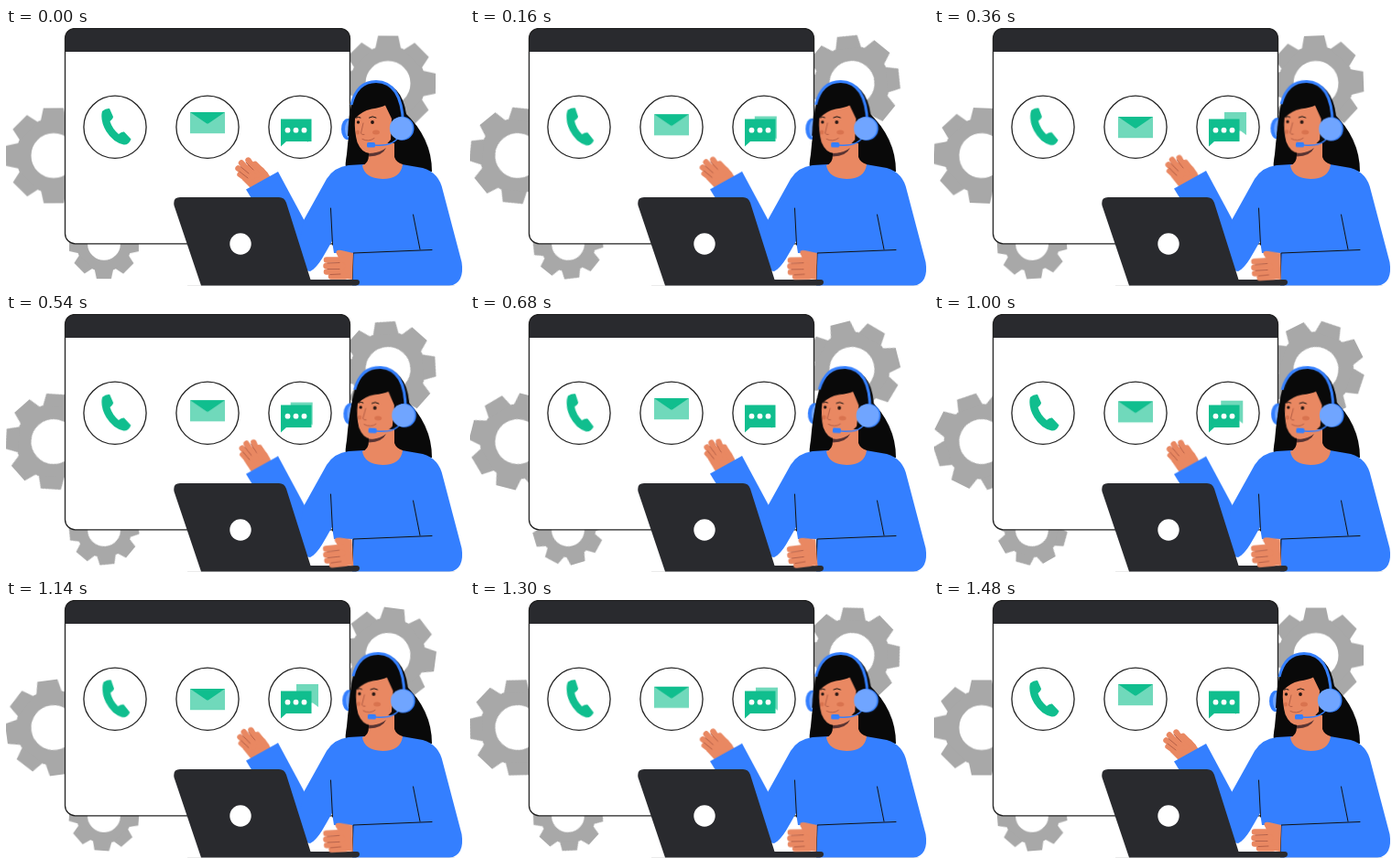
Recreate the animation shown at these times as an HTML page without scripts. Size 500x282 px, loop 1500 ms.

```html
<!DOCTYPE html>
<html lang="en">
<head>
<meta charset="utf-8">
<title>Support agent</title>
<style>
  :root {
    --ink: #292a2e;
    --blue: #347fff;
    --pale-blue: #70a5ff;
    --green: #10be8e;
    --mint: #70d9bb;
    --skin: #e98862;
    --crease: #a9553f;
  }
  html, body { margin: 0; width: 100%; height: 100%; overflow: hidden; background: #fff; }
  svg { display: block; width: 100%; height: 100%; }

  .ink { fill: var(--ink); }
  .blue { fill: var(--blue); }
  .pale { fill: var(--pale-blue); }
  .green { fill: var(--green); }
  .mint { fill: var(--mint); }
  .skin { fill: var(--skin); }
  .hair { fill: #090909; }
  .line { fill: none; stroke: #111; stroke-width: 1; stroke-linecap: round; }
  .crease { fill: none; stroke: var(--crease); stroke-width: .8; stroke-linecap: round; }
  .finger { fill: none; stroke: var(--skin); stroke-linecap: round; }
  .ring { fill: #fff; stroke: #222; stroke-width: 1.3; }

  /* All but the small gear close at 98.67% and rest for the last 20 ms. */
  .spin, .turn, .sway, .bob, .shake { animation: 1.5s infinite; }
  .spin, .turn { animation-timing-function: linear; }
  .spin { animation-name: spin; }
  .turn { animation-name: turn; }
  .sway, .bob, .shake { animation-timing-function: cubic-bezier(.37, 0, .63, 1); }
  .sway { animation-name: sway; }
  .bob { animation-name: bob; }
  .shake { animation-name: shake; }

  @keyframes spin { 98.67%, 100% { transform: rotate(var(--angle)); } }
  @keyframes turn { to { transform: rotate(var(--angle)); } }
  @keyframes sway {
    0%, 98.67%, 100% { transform: none; }
    49.33% { transform: var(--to); }
  }
  @keyframes bob {
    0%, 46.67%, 52.67%, 98.67%, 100% { transform: none; }
    23.33%, 76% { transform: var(--to); }
  }
  @keyframes shake {
    0%, 32.89%, 65.78%, 98.67%, 100% { transform: none; }
    16.44%, 49.33%, 82.22% { transform: var(--to); }
  }

  .cw { --angle: 360deg; }
  .ccw { --angle: -360deg; }
  .phone { --to: rotate(7deg); transform-origin: 120px 108px; }
  .mail { --to: translateY(5px); }
  .reply { --to: translate(11px, -8px); }
  .head { --to: rotate(3deg); transform-origin: 408px 165px; }
  .forearm { --to: translateY(-2px); }
  .wave { --to: rotate(14deg); transform-origin: 280px 172px; }
  .typing { --to: rotate(-7deg); transform-origin: 380px 262px; }
</style>
</head>
<body>
<svg viewBox="0 0 500 282" preserveAspectRatio="none">
  <defs>
    <path id="tooth" d="M-11-52H11L14-38H-14Z"/>
    <g id="teeth">
      <use href="#tooth"/>
      <use href="#tooth" transform="rotate(90)"/>
      <use href="#tooth" transform="rotate(180)"/>
      <use href="#tooth" transform="rotate(270)"/>
    </g>
    <g id="gear" fill="#a8a8a8">
      <circle r="32.8" fill="none" stroke="#a8a8a8" stroke-width="16.6"/>
      <use href="#teeth"/>
      <use href="#teeth" transform="rotate(45)"/>
    </g>
  </defs>

  <g transform="translate(52 139.5)"><use class="spin ccw" href="#gear"/></g>
  <g transform="translate(417 60.5)"><use class="spin cw" href="#gear"/></g>
  <g transform="translate(107 236) scale(.73)"><use class="turn cw" href="#gear"/></g>

  <!-- window -->
  <rect x="64.5" y=".5" width="311" height="235.3" rx="11" fill="#fff"/>
  <path class="ink" d="M64.5 26V11.5Q64.5.5 75.5.5H364.5Q375.5.5 375.5 11.5V26Z"/>
  <rect x="64.5" y=".5" width="311" height="235.3" rx="11" fill="none" stroke="#222" stroke-width="1.3"/>

  <circle class="ring" cx="119" cy="108.3" r="34.1"/>
  <circle class="ring" cx="220" cy="108.3" r="34.1"/>
  <circle class="ring" cx="321" cy="108.3" r="34.1"/>

  <path class="green shake phone" d="M105 91Q109 87.5 113 88L117 97Q117 99 113.5 102Q116 110 123 116Q126 113 129 113.5L136.5 121.5Q134 128 128.5 127.5Q117 125 109.5 113Q102.5 101 105 91Z"/>

  <g class="bob mail">
    <rect class="mint" x="201" y="92" width="38" height="23.2"/>
    <path class="green" d="M201 92H239L221.5 104Q220 105 218.5 104Z"/>
  </g>

  <path class="mint bob reply" d="M306 100H330V125L324 120.500H306Z"/>
  <path class="green" d="M300 99.500H333.500V124H306L300 129.500Z"/>
  <g fill="#fff">
    <circle cx="307.500" cy="111.700" r="2.900"/>
    <circle cx="316.500" cy="111.700" r="2.900"/>
    <circle cx="325.500" cy="111.700" r="2.900"/>
  </g>

  <!-- hair behind the shoulders -->
  <g class="sway head">
    <ellipse class="blue" cx="373" cy="110.5" rx="7" ry="11.5"/>
    <ellipse class="pale" cx="375" cy="110.5" rx="5" ry="10"/>
  </g>
  <path class="hair" d="M379 92H435Q465 120 465 157L371 152Q370 150 372 138Q374 112 379 92Z"/>
  <path class="hair sway head" d="M373 118Q374 96 377 84Q384 59 405 59Q432 60 437 94L440 118Z"/>

  <!-- raised arm -->
  <g class="sway forearm">
    <g class="sway wave">
      <path class="skin" d="M269 177L258 166L256 154L270 146L281 153L289 163Z"/>
      <g class="finger" stroke-width="6.4">
        <path d="M275 160L264.500 144.500"/>
        <path d="M270 161L257 147.500"/>
        <path d="M268 164L253.500 153.500"/>
        <path d="M268 169L255.500 160"/>
        <path d="M283 160L272 149"/>
      </g>
      <path class="crease" d="M270 155L262 147M265 159L256 151.500M264 164L255 157"/>
    </g>
    <path class="blue" d="M262 176.500L297 157L326 211L340 250Q333 268 322 263Q312 258 262 176.500Z"/>
  </g>

  <!-- jumper and neck -->
  <path class="blue" d="M325 210L350 165Q358 152 374 150L391 149H432L455 153Q473 158 477 178L497.500 256Q501 279 484 282H378V246L358 246L356 233C348 246 342 261 332 266L315 262Z"/>
  <path class="skin" d="M396 126H424V141Q426 147 433 149Q431 165 411 165Q391 164 389 150Q396 148 396 139Z"/>
  <path fill="#5b3533" d="M396 136Q406 138 415 131Q411 140 396 140.500Z"/>
  <path class="line" d="M354.500 197L356.500 237M444.500 204L452 242M378 275L379 246L465 242.500"/>

  <!-- head -->
  <g class="sway head">
    <path class="skin" d="M381 99Q388 91 399 88.500Q409 87 414 84.500L421 99L420 122Q408 137 397 137Q388 136 383.500 125Q380 112 381 99Z"/>
    <ellipse cx="404" cy="114" rx="4" ry="2.500" fill="#d9734f"/>
    <ellipse cx="384" cy="114" rx="2" ry="2.500" fill="#d9734f"/>
    <circle cx="400" cy="103" r="1.900" fill="#241512"/>
    <circle cx="384.500" cy="103" r="1.700" fill="#241512"/>
    <path class="line" d="M396.500 98Q400 95.500 404 98M382.500 98Q384 96.500 387 98"/>
    <path class="crease" d="M390 104L387.500 115Q388 117 391 116.500M389 121.500Q396 125 402 120.500"/>
    <path d="M377 84Q383 58.500 404 58.500Q432 59 433.500 104" fill="none" stroke="var(--blue)" stroke-width="3"/>
    <path d="M402 128Q423 130 429 118" fill="none" stroke="var(--blue)" stroke-width="1.400"/>
    <rect class="blue" x="394" y="125" width="9" height="5.500" rx="1.500"/>
    <circle class="blue" cx="432.500" cy="109.700" r="13"/>
    <circle class="pale" cx="431.300" cy="109.700" r="12.500"/>
  </g>

  <!-- laptop -->
  <path d="M198 281.500H490" stroke="#ddd" stroke-width=".6"/>
  <path class="ink" d="M213 281.500L183.500 194Q182 185 190 185H298Q304 185 306 191L332.500 275H383Q386 275 386 278T382 281.500Z"/>
  <circle cx="256" cy="236" r="11.700" fill="#fff"/>

  <!-- hand at the keyboard -->
  <g class="sway typing">
    <path class="skin" d="M379 246L366 243Q360 242 360.500 246L363 251V273L378 275Z"/>
    <g class="finger" stroke-width="6.500">
      <path d="M350 253.500H367"/>
      <path d="M349.500 260H367"/>
      <path d="M350 266.500H367"/>
      <path d="M355 271.500H370"/>
    </g>
    <path class="crease" d="M351 257L364 256.500M351 263.500H364M354 269.500L365 269"/>
  </g>
</svg>
</body>
</html>
```
